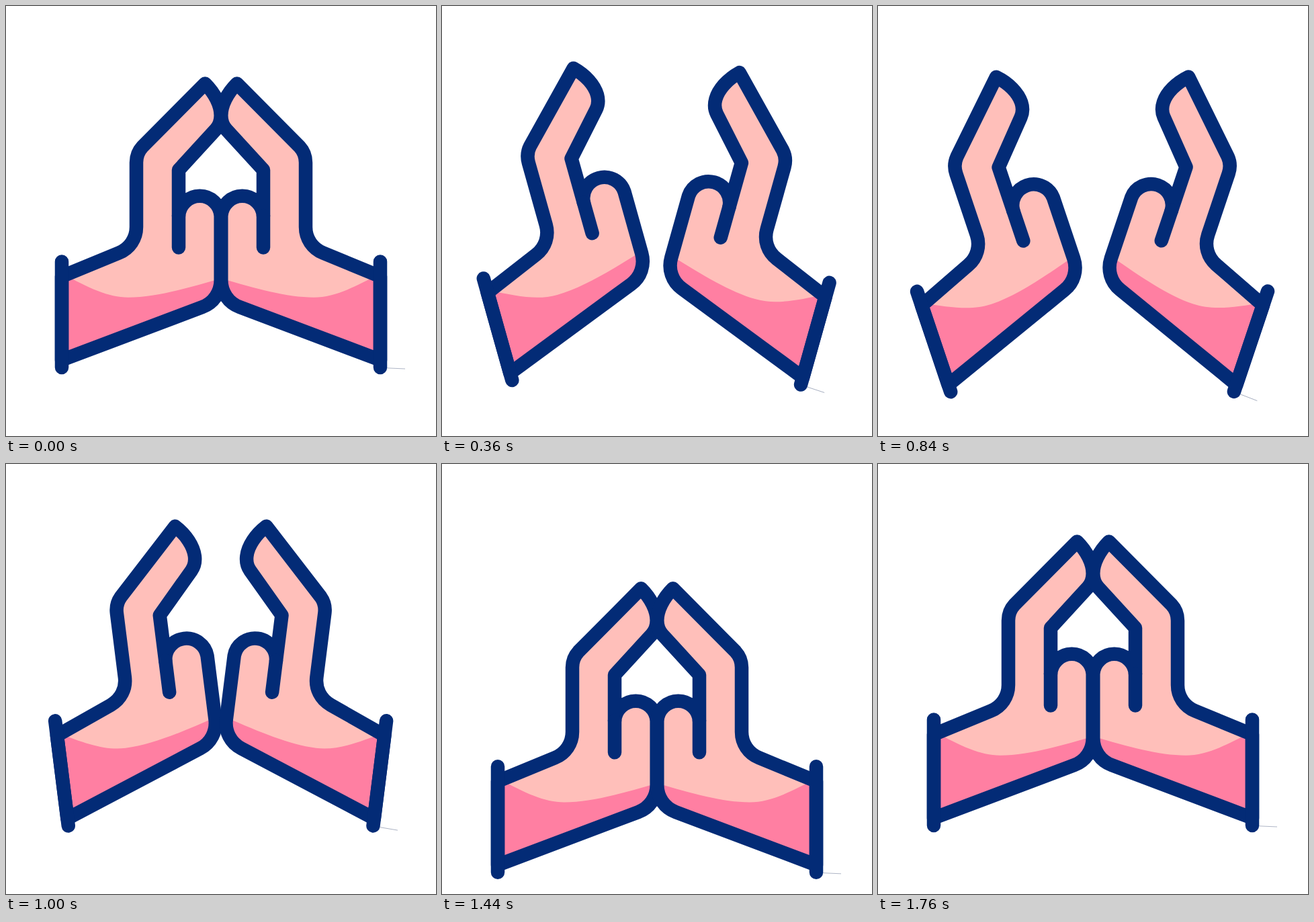
An HTML page that plays this animation: 640x640 px, repeating every 2000 ms.

```html
<!DOCTYPE html>
<html lang="en">
<head>
<meta charset="utf-8">
<title>Praying hands</title>
<style>
  html, body { margin: 0; width: 100%; height: 100%; overflow: hidden; background: #fff; }
  svg { display: block; width: 100vw; height: 100vh; }
  .skin { fill: #ffbfba; }
  .shade { fill: #ff7fa2; }
  .line { fill: none; stroke: #032b76; stroke-width: 20.5; stroke-linecap: round; stroke-linejoin: round; }
  .hair { fill: none; stroke: #9aa3b7; stroke-width: .8; }
</style>
</head>
<body>
<svg viewBox="0 0 640 640">
  <defs>
    <path id="outline" d="M83 402.500 L168 367.500 C184 361 194 346 194 329 V233 C194 224 197 216 203 209.500
      L296.300 115.500 C311 130 319.700 148 319.700 163 C319.700 172 317 178.500 312 184 L257 244 V312.500
      A31.400 31.400 0 0 1 319.700 312.500 V408 C319.700 426 309 442 292 448.200 L83 527 Z"/>
    <g id="hand">
      <use href="#outline" class="skin"/>
      <path class="shade" d="M83 398 C124 420 152 433.700 182 433.700 C222 433.700 268 420.500 319.700 405.500
        V408 C319.700 426 309 442 292 448.200 L83 527 Z"/>
      <use href="#outline" class="line"/>
      <path class="line" d="M257 312 V359.500 M83 380.500 V538"/>
    </g>
  </defs>
  <g id="left"><use href="#hand"/></g>
  <g transform="translate(640) scale(-1 1)">
    <g id="right">
      <path class="hair" d="M80 538.500 L46 540"/>
      <use href="#hand"/>
    </g>
  </g>
</svg>
<script>
  const LOOP = 2000, STEP = 40, LAST = 43;

  // Each track lists [step, value] stops, joined by a sine ease.
  const turn = [[0.6, 0], [11.3, 20], [18.35, 20], [27.9, 0]];
  const dropAfter = [[15.8, 74], [24.35, 0], [32.7, 71.3], [34, 72], [43, 0]];
  const hands = [
    { node: document.getElementById("left"), pivotY: 460, drop: [[4.65, 0], [14.25, 74], ...dropAfter] },
    { node: document.getElementById("right"), pivotY: 454, drop: [[3.75, 0], [14.1, 74], ...dropAfter] }
  ];

  function valueAt(track, step) {
    const next = track.findIndex(([at]) => at > step);
    if (next === 0) return track[0][1];
    if (next < 0) return track[track.length - 1][1];
    const [[t0, v0], [t1, v1]] = [track[next - 1], track[next]];
    const eased = (1 - Math.cos(Math.PI * (step - t0) / (t1 - t0))) / 2;
    return v0 + (v1 - v0) * eased;
  }

  function draw(now) {
    const tick = Math.floor((now % LOOP) / STEP) - 1;
    const step = Math.min(LAST, Math.max(0, tick));
    for (const { node, pivotY, drop } of hands) {
      const y = valueAt(drop, step), angle = valueAt(turn, step);
      node.setAttribute("transform", `translate(0 ${y}) rotate(${-angle} 90 ${pivotY})`);
    }
  }

  const start = performance.now();
  function loop() {
    draw(performance.now() - start);
    requestAnimationFrame(loop);
  }
  loop();
</script>
</body>
</html>
```
